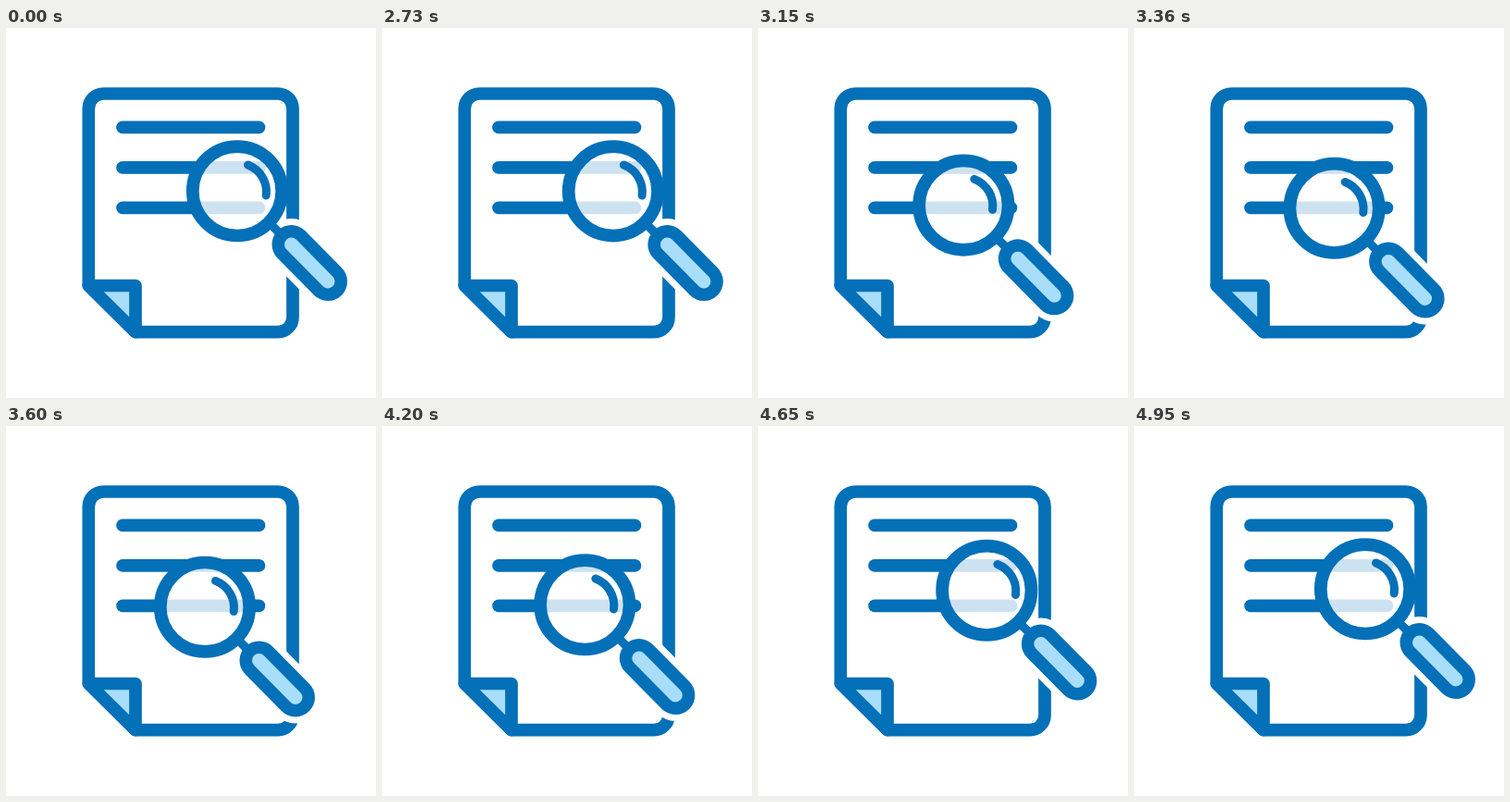
An HTML page for the animation above (5.43 s loop, 400 by 400 pixels).

```html
<!DOCTYPE html>
<html lang="en">
<head>
<meta charset="utf-8">
<title>Document search</title>
<style>
  html, body { margin: 0; width: 100%; height: 100%; overflow: hidden; background: #fff; }
  svg { display: block; width: 100%; height: 100%; }
  .line { fill: none; stroke: #0470b8; stroke-width: 13.7; stroke-linecap: round; stroke-linejoin: round; }
  .tint { fill: #a8defa; }
</style>
</head>
<body>
<svg viewBox="0 0 400 400">
  <g class="line">
    <path d="M140 328.7H294A16 16 0 0 0 310 312.7V87A16 16 0 0 0 294 71H105.3A16 16 0 0 0 89.3 87V278.5Z"/>
    <path class="tint" d="M89.3 278.5H140V328.7Z"/>
    <path d="M126 107.4H273.5M126 150.9H273.5M126 194.3H273.5"/>
  </g>
  <g id="glass" class="line">
    <path d="M308.5 234L348 274" stroke="#fff" style="stroke:#fff;stroke-width:56"/>
    <path d="M284 210L300 226" style="stroke-width:9.5"/>
    <circle cx="250" cy="176.3" r="48.2" fill="#fff" fill-opacity=".8"/>
    <path d="M261.5 148A31 31 0 0 1 281.2 181" style="stroke-width:9"/>
    <path d="M308.5 234L348 274" style="stroke-width:42"/>
    <path d="M308.5 234L348 274" style="stroke:#a8defa;stroke-width:15"/>
  </g>
</svg>
<script>
  const FRAME = 30, FRAMES = 181, MOVE = 30;
  const OUT = 90, BACK = 135;
  const SHIFT = { x: -35, y: 19.4 };
  const glass = document.getElementById('glass');

  // Cubic bezier easing (.333, 0, .2, 1), solved by bisection.
  function ease(x) {
    if (x <= 0) return 0;
    if (x >= 1) return 1;
    let low = 0, high = 1, s;
    for (let i = 0; i < 30; i++) {
      s = (low + high) / 2;
      const r = 1 - s;
      const bx = 3 * s * r * r * 0.333 + 3 * s * s * r * 0.2 + s ** 3;
      if (bx < x) low = s; else high = s;
    }
    return s * s * (3 - 2 * s);
  }

  function render(ms) {
    const frame = Math.floor(ms / FRAME) % FRAMES;
    const p = ease((frame - OUT) / MOVE) - ease((frame - BACK) / MOVE);
    glass.setAttribute('transform', `translate(${SHIFT.x * p} ${SHIFT.y * p})`);
  }

  function tick() {
    render(performance.now());
    requestAnimationFrame(tick);
  }
  tick();
</script>
</body>
</html>
```
